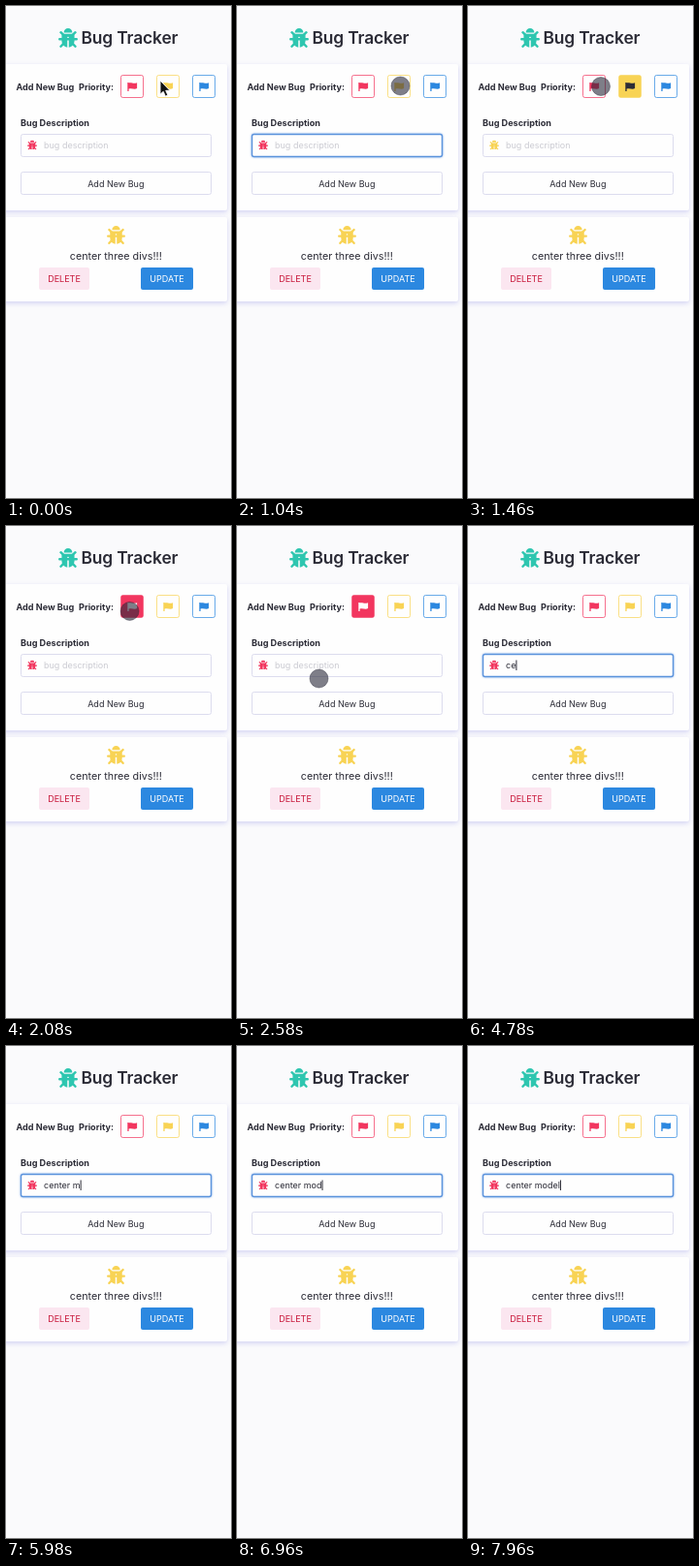
Write an HTML page that moves like this. It is 232x508 px and loops after 8000 ms.

```html
<!DOCTYPE html>
<html lang="en">
<head>
<meta charset="utf-8">
<title>Bug Tracker</title>
<style>
  html, body { margin: 0; width: 100%; height: 100%; overflow: hidden; background: #fafafc; }
  svg { display: block; width: 232px; height: 508px; }
  text { font: 9px Inter, sans-serif; font-optical-sizing: none; fill: #2b2b36; white-space: pre; }
  .title { font-size: 17.4px; font-weight: 600; letter-spacing: -.15px; }
  .label { font-size: 9.1px; font-weight: 700; }
  .mid { text-anchor: middle; }
  .card { fill: #fefefe; filter: drop-shadow(0 2px 2.5px #5a5ad83c); }
  .field { fill: #fefefe; stroke: #dcdcee; }
  .field.on { stroke: #5b93dc; stroke-width: 1.4; filter: drop-shadow(0 0 1px #8fb6ec); }
  .flag rect { fill: #fefefe; stroke: currentColor; stroke-opacity: .7; }
  .flag path { fill: currentColor; }
  .flag.on rect { fill: currentColor; stroke-opacity: .5; }
  .flag.on path { fill: var(--active); }
  #red { color: #f2365f; --active: #fefefe; }
  #yellow { color: #f8d354; --active: #2b2b36; }
  #blue { color: #2c88e0; --active: #fefefe; }
</style>
</head>
<body>
<svg viewBox="0 0 232 508">
  <defs>
    <symbol id="bug" viewBox="0 0 512 512">
      <path d="M368 112H144a112 112 0 0 1 224 0ZM110 150H402C420 160 424 180 424 200V340A168 168 0 0 1 276 503V236a12 12 0 0 0-12-12H248a12 12 0 0 0-12 12V503A168 168 0 0 1 88 340V200C88 180 92 160 110 150Z"/>
      <path d="M32 288H480M64 108L130 172M448 108L382 172M64 480L130 412M448 480L382 412" fill="none" stroke="currentColor" stroke-width="62" stroke-linecap="round"/>
    </symbol>
  </defs>

  <use href="#bug" x="54" y="23" width="20" height="20" fill="#2ec6b0" color="#2ec6b0"/>
  <text class="title" x="77.5" y="38.7">Bug Tracker</text>

  <rect class="card" x="-4" y="60" width="232" height="151" rx="2"/>
  <text class="label" x="10.5" y="87">Add New Bug</text>
  <text class="label" x="75" y="87">Priority:</text>
  <g class="flag" id="red" transform="translate(118 71)"></g>
  <g class="flag" id="yellow" transform="translate(155 71)"></g>
  <g class="flag" id="blue" transform="translate(192 71)"></g>

  <text class="label" x="15" y="124">Bug Description</text>
  <rect class="field" id="input" x="15.5" y="132.5" width="196" height="23" rx="2"/>
  <use id="inputBug" href="#bug" x="22" y="138.5" width="10" height="10"/>
  <text id="hint" x="39" y="147" style="fill:#cbcbd2">bug description</text>
  <text id="typed" x="39" y="147"></text>
  <rect id="caret" y="138.5" width="1" height="10.5" fill="#2b2b36"/>
  <rect class="field" x="15.5" y="171.5" width="196" height="23" rx="2"/>
  <text class="mid" x="113.3" y="187">Add New Bug</text>

  <rect class="card" x="-4" y="218" width="232" height="87" rx="2"/>
  <use href="#bug" x="104" y="227" width="19" height="19" fill="#f8d354" color="#f8d354"/>
  <text class="mid" x="113.3" y="261.8" style="font-size:10.75px">center three divs!!!</text>
  <rect x="34" y="270" width="52" height="23" rx="2" fill="#fbe6f0"/>
  <text class="mid" x="60" y="285" style="fill:#c8173a">DELETE</text>
  <rect x="139" y="270" width="54" height="23" rx="2" fill="#2c88e0"/>
  <text class="mid" x="166" y="285" style="fill:#fefefe">UPDATE</text>

  <path id="arrow" d="M0 0V14.2L3.2 11.3L5.4 16.2L7.9 15.1L5.7 10.3H10Z" fill="#111" stroke="#fff" stroke-width=".9"/>
  <circle id="touch" r="9.5" fill="#28283899" stroke="#28283866"/>
</svg>
<script>
const LOOP = 8000;
const TOUCH_START = 500, TOUCH_END = 4500;
const TEXT = 'center model';
const KEY_TIMES = [4600, 4780, 4960, 5120, 5300, 5450, 5600, 5800, 6300, 6700, 7200, 7600];
const FLAG_PATH = 'M0 .4H1.3V1C4 -.2 5.6 2.3 9.8 .7V6.6C6.6 8.1 4.6 5.8 1.3 7V9.6H0Z';
const PRIORITIES = ['red', 'yellow', 'blue'];

// Focused element from each time on.
const FOCUS = [[0, ''], [TOUCH_START, 'input'], [1180, 'yellow'], [1750, 'red'], [3200, 'input']];

// Pointer stops: time, x, y.
const POINTER = [
  [0, 159, 77], [450, 168, 82], [1040, 168.5, 82.5], [1260, 167, 83], [1460, 137, 83],
  [1600, 130, 83], [2000, 130, 84], [2580, 84.5, 157.5], [3000, 89, 147], [LOOP, 89, 147]
];

const $ = id => document.getElementById(id);
const show = (id, visible) => $(id).setAttribute('visibility', visible ? 'visible' : 'hidden');
const ease = p => p * p * (3 - 2 * p);

for (const id of PRIORITIES) {
  $(id).innerHTML = '<rect x=".5" y=".5" width="23" height="23" rx="2"/>' +
    `<path transform="translate(7.3 7.5)" d="${FLAG_PATH}"/>`;
}

function pointerAt(t) {
  const next = POINTER.findIndex(stop => stop[0] > t);
  const [t0, x0, y0] = POINTER[next - 1], [t1, x1, y1] = POINTER[next];
  const p = ease((t - t0) / (t1 - t0));
  return [x0 + (x1 - x0) * p, y0 + (y1 - y0) * p];
}

function draw(now) {
  const t = now % LOOP;
  const [focusTime, focus] = FOCUS.findLast(step => step[0] <= t);
  for (const id of [...PRIORITIES, 'input']) $(id).classList.toggle('on', id === focus);

  const bugColor = focus === 'yellow' ? '#f8d354' : '#f2365f';
  $('inputBug').setAttribute('fill', bugColor);
  $('inputBug').setAttribute('color', bugColor);

  const count = KEY_TIMES.filter(time => time <= t).length;
  $('typed').textContent = TEXT.slice(0, count);
  show('hint', count === 0);
  const lastInput = count ? KEY_TIMES[count - 1] : focusTime;
  const width = count ? $('typed').getComputedTextLength() : 0;
  $('caret').setAttribute('x', 39 + width);
  show('caret', focus === 'input' && (t - lastInput) % 1000 < 500);

  const place = `translate(${pointerAt(t)})`;
  $('arrow').setAttribute('transform', place);
  $('touch').setAttribute('transform', place);
  show('arrow', t < TOUCH_START);
  show('touch', t >= TOUCH_START && t < TOUCH_END);
  requestAnimationFrame(draw);
}
requestAnimationFrame(draw);
</script>
</body>
</html>
```
